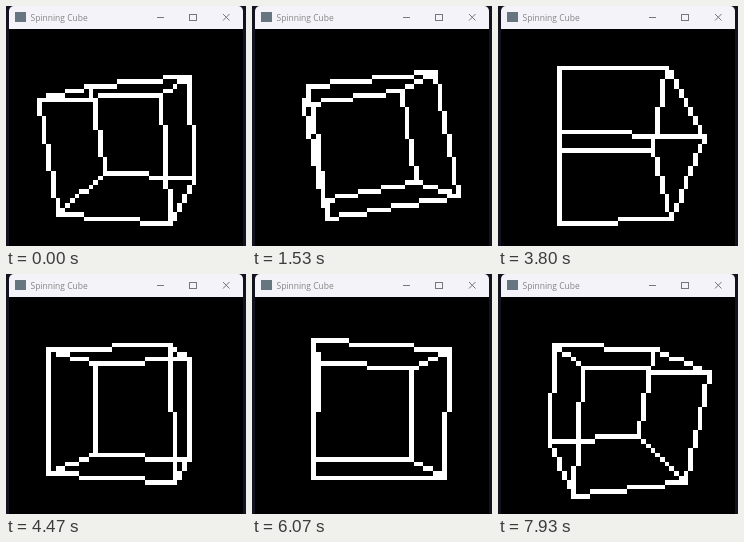
These frames come from a looping animation (240 by 240 pixels, 8000 ms). An HTML page with a canvas:

```html
<!DOCTYPE html>
<html lang="en">
<head>
<meta charset="utf-8">
<title>Spinning Cube</title>
<style>
  html, body { margin: 0; width: 100%; height: 100%; overflow: hidden; background: #12131f; }
  canvas { display: block; width: 240px; height: 240px; }
</style>
</head>
<body>
<canvas id="stage" width="240" height="240"></canvas>
<script>
const ctx = document.getElementById('stage').getContext('2d');

const LOOP = 8000;
const STEP = 200 / 3;                // 15 pictures per second
const LEFT = 3, TOP = 23;            // corner of the client area
const CELL_W = 4.68, CELL_H = 4.58;  // one chunky pixel
const CENTER = 25;                   // middle of the 50 x 50 grid
const FOCUS = 71.7, DISTANCE = 6;
const RAD = Math.PI / 180;

// Corner i holds its x, y, z signs in bits 0, 1, 2.
const corners = Array.from({ length: 8 }, (_, i) =>
  [0, 1, 2].map(bit => (i >> bit & 1) * 2 - 1));
const edges = [];
for (let i = 0; i < 8; i++) {
  for (const bit of [1, 2, 4]) if (!(i & bit)) edges.push([i, i | bit]);
}

function project([x, y, z], pitch, yaw) {
  const y1 = y * Math.cos(pitch) - z * Math.sin(pitch);
  const z1 = y * Math.sin(pitch) + z * Math.cos(pitch);
  const x2 = x * Math.cos(yaw) + z1 * Math.sin(yaw);
  const z2 = z1 * Math.cos(yaw) - x * Math.sin(yaw);
  const scale = FOCUS / (DISTANCE + z2);
  return [Math.floor(CENTER + x2 * scale), Math.floor(CENTER + y1 * scale)];
}

function plot(col, row) {
  const x = Math.round(LEFT + col * CELL_W);
  const y = Math.round(TOP + row * CELL_H);
  const right = Math.round(LEFT + (col + 1) * CELL_W);
  const bottom = Math.round(TOP + (row + 1) * CELL_H);
  ctx.fillRect(x, y, right - x, bottom - y);
}

// Bresenham
function cellLine([x, y], [x1, y1]) {
  const dx = Math.abs(x1 - x), dy = -Math.abs(y1 - y);
  const sx = Math.sign(x1 - x), sy = Math.sign(y1 - y);
  let err = dx + dy;
  for (;;) {
    plot(x, y);
    if (x === x1 && y === y1) return;
    const e2 = 2 * err;
    if (e2 >= dy) { err += dy; x += sx; }
    if (e2 <= dx) { err += dx; y += sy; }
  }
}

function strokeLines(lines) {
  ctx.beginPath();
  for (const [x0, y0, x1, y1] of lines) {
    ctx.moveTo(x0, y0);
    ctx.lineTo(x1, y1);
  }
  ctx.stroke();
}

function drawWindow() {
  ctx.fillStyle = '#12131f';
  ctx.fillRect(0, 0, 240, 240);
  ctx.fillStyle = '#f3f3f9';
  ctx.beginPath();
  ctx.roundRect(3, 0, 234, 30, [5, 5, 0, 0]);
  ctx.fill();
  ctx.fillStyle = '#000';
  ctx.fillRect(LEFT, TOP, 234, 240 - TOP);

  ctx.fillStyle = '#66757f';
  ctx.fillRect(9, 6, 11, 10);
  ctx.fillStyle = '#858585';
  ctx.font = '8.5px "Open Sans", "Noto Sans", sans-serif';
  ctx.fillText('Spinning Cube', 24.5, 15);

  ctx.strokeStyle = '#777';
  ctx.lineWidth = 1;
  strokeLines([[151, 11.5, 158, 11.5]]);
  ctx.strokeRect(183.5, 8.5, 7, 6);
  strokeLines([[217, 8, 223.5, 14.5], [223.5, 8, 217, 14.5]]);
}

function drawCube(ms) {
  // The spin hesitates briefly at the start, then slowly catches up.
  const s = ms / 1000;
  const t = 1.0095 * s - 0.11 * (1 - Math.exp(-2 * s));
  const pitch = 16.6 * RAD + t;
  const yaw = 20.7 * RAD + 0.7 * t;
  const points = corners.map(c => project(c, pitch, yaw));
  ctx.fillStyle = '#fff';
  for (const [a, b] of edges) cellLine(points[a], points[b]);
}

function frame() {
  const step = Math.floor(performance.now() % LOOP / STEP + 0.06);
  drawWindow();
  drawCube(step % 120 * STEP);
  requestAnimationFrame(frame);
}
frame();
</script>
</body>
</html>
```
